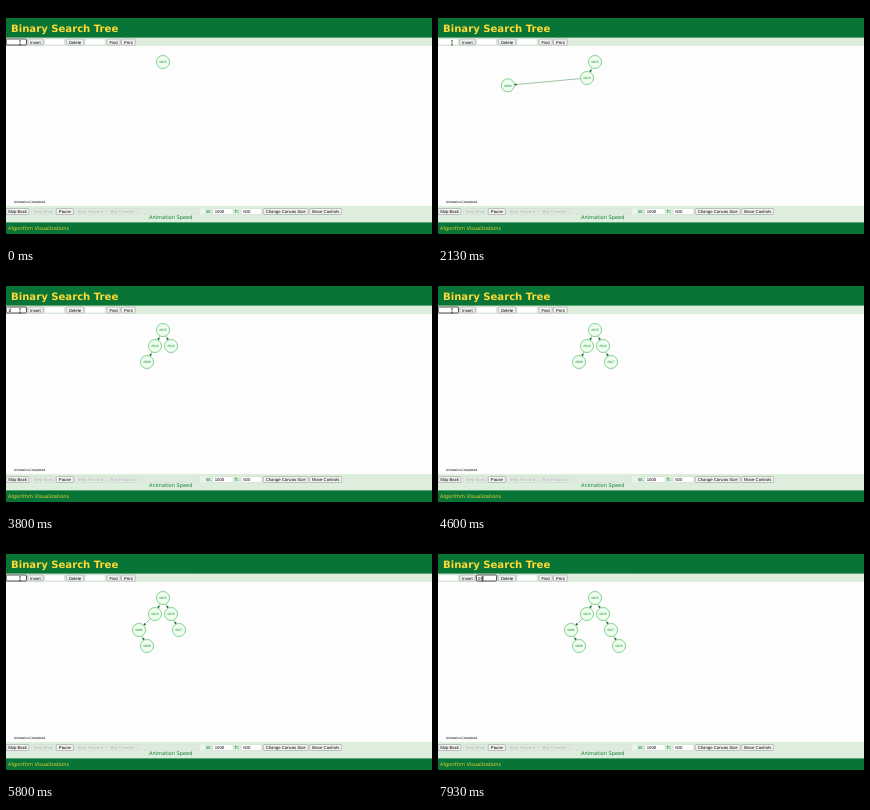
These frames come from a looping animation (426 px wide and 240 px high, 8000 ms). An HTML page:

```html
<!DOCTYPE html>
<html lang="en">
<head>
<meta charset="utf-8">
<title>Binary Search Tree</title>
<style>
  html, body { margin: 0; width: 100%; height: 100%; overflow: hidden; background: #000; }
  svg { display: block; width: 100%; height: 100%; }
  text {
    font-family: "Liberation Sans", Arial, sans-serif;
    font-size: 4.25px;
    text-rendering: geometricPrecision;
  }
  .page { font-family: "DejaVu Sans", Verdana, sans-serif; font-size: 5.08px; }
  .title { font-size: 10.1px; font-weight: bold; }
  .gold { fill: #ffd936; }
  .green { fill: #15813c; }
  .small { font-size: 3.25px; }
  .button { fill: #f1f2f1; stroke: #8a8f8a; stroke-width: .5; }
  .off .button { fill: #e3ece3; stroke: #cad5ca; }
  .off text { fill: #a9b5a9; }
  .field { fill: #fff; stroke: #bcc5bc; stroke-width: .4; }
  .field.focused { stroke: #222; stroke-width: .8; }
  .node circle { fill: #efffef; stroke: #58b865; stroke-width: .7; }
  .node text { fill: #16802b; font-size: 3.25px; text-anchor: middle; }
  .edge { stroke: #2a7a37; stroke-width: .45; fill: #0b4a18; }
</style>
</head>
<body>
<svg viewBox="0 0 426 240" preserveAspectRatio="none">
  <rect width="426" height="240"/>
  <rect y="12" width="426" height="216" fill="#ddeedd"/>
  <rect y="12" width="426" height="19.6" fill="#087536"/>
  <rect y="40" width="426" height="160" fill="#fdfdfd"/>
  <rect y="216.4" width="426" height="11.6" fill="#087536"/>
  <text class="page title gold" x="5" y="25.8">Binary Search Tree</text>
  <text class="page gold" x="2" y="224.4" fill-opacity=".88">Algorithm Visualizations</text>
  <text class="page green" x="143" y="213.3">Animation Speed</text>
  <text class="page green" x="200" y="207.2">w:</text>
  <text class="page green" x="228.6" y="207.2">h:</text>
  <rect x="132" y="202.5" width="62" height="6" fill="#dfeadf" stroke="#d3dfd3" stroke-width=".4"/>
  <rect x="194" y="202.5" width="5" height="6" fill="#ecf2ec"/>
  <text class="small" x="8" y="196.7">Animation Completed</text>
  <g id="controls"></g>
  <g id="edges"></g>
  <g id="nodes"></g>
  <path id="caret" stroke="#111" stroke-width=".5" d="M0 34.1V38"/>
  <path id="pointer" stroke="#222" stroke-width=".55" fill="none" d="M-1 34.7H1M0 34.7V39M-1 39H1"/>
</svg>
<script>
const LOOP = 8000;
const RADIUS = 6.5;
const byId = id => document.getElementById(id);

function add(parent, tag, attrs = {}, text = '') {
  const el = document.createElementNS('http://www.w3.org/2000/svg', tag);
  set(el, attrs);
  el.textContent = text;
  return parent.appendChild(el);
}

function set(el, attrs) {
  for (const name in attrs) el.setAttribute(name, attrs[name]);
}

function button(label, x, y, width, off = false) {
  const group = add(byId('controls'), 'g', off ? { class: 'off' } : {});
  add(group, 'rect', { class: 'button', x, y, width, height: 6, rx: .8 });
  add(group, 'text', { x: x + width / 2, y: y + 4.5, 'text-anchor': 'middle' }, label);
}

function field(x, y, value = '') {
  const box = add(byId('controls'), 'rect', { class: 'field', x, y, width: 20.2, height: 6, rx: .7 });
  const text = add(byId('controls'), 'text', { x: x + 1.7, y: y + 4.5 }, value);
  return { x, box, text };
}

const insertField = field(.2, 33);
button('Insert', 22, 33, 15);
const deleteField = field(38.4, 33);
button('Delete', 60.3, 33, 17.5);
field(79, 33);
button('Find', 101, 33, 13.2);
button('Print', 115.4, 33, 13.9);

button('Skip Back', .2, 202.5, 22.6);
button('Step Back', 25.5, 202.5, 23.5, true);
button('Pause', 50.3, 202.5, 17.2);
button('Step Forward', 69, 202.5, 30.5, true);
button('Skip Forward', 101, 202.5, 30, true);
field(207, 202.5, '1000');
field(235.5, 202.5, '500');
button('Change Canvas Size', 257.3, 202.5, 44.7);
button('Move Controls', 303.7, 202.5, 32);

// Each insertion: value, parent, place, then typing, enter, settled and refocus times.
const inserts = [
  [15, null, 157, 56],
  [10, 15, 149, 72, 350, 650, 1050, 1250],
  [8, 10, 141, 88, 1500, 1800, 2250, 2500],
  [16, 15, 165, 72, 2800, 3130, 3480, 3620],
  [17, 16, 173, 88, 3800, 4050, 4400, 4530],
  [9, 8, 141, 104, 4850, 5070, 5450, 5650],
  [20, 17, 181, 104, 5950, 6180, 6580, 8000]
];

const nodes = inserts.map(([value, parent, x, y, type, enter = -1, settled = 0, focus]) => {
  const group = add(byId('nodes'), 'g', { class: 'node' });
  add(group, 'circle', { r: RADIUS });
  add(group, 'text', { y: 1.2 }, String(value).padStart(4, '0'));
  const edge = parent && add(byId('edges'), 'path', { class: 'edge' });
  return { value, parent, x, y, type, enter, settled, focus, group, edge };
});
const find = value => nodes.find(node => node.value === value);

function ease(from, to, t) {
  const p = Math.min(1, Math.max(0, (t - from) / (to - from)));
  return p * p * (3 - 2 * p);
}

function place(node, t) {
  const { enter, settled } = node;
  const p = ease(enter + (settled - enter) * .5, settled, t);
  let x = 10 + (node.x - 10) * p;
  const y = 72 + (node.y - 72) * p;
  if (node.value === 8) x -= 8 * ease(5260, 5450, t);
  return { x, y };
}

function arrow(a, b) {
  const angle = Math.atan2(b.y - a.y, b.x - a.x);
  const along = (point, distance, turn = 0) =>
    [point.x + distance * Math.cos(angle + turn), point.y + distance * Math.sin(angle + turn)];
  const tip = along(b, -RADIUS);
  const wing = turn => along({ x: tip[0], y: tip[1] }, -2.3, turn);
  return `M${along(a, RADIUS)}L${tip}M${wing(.45)}L${tip}L${wing(-.45)}Z`;
}

function typed(value, start, t) {
  const text = String(value);
  return text.slice(0, Math.max(0, Math.floor((t - start) / 130) + 1));
}

function drawTree(t) {
  for (const node of nodes) {
    const { x, y } = place(node, t);
    const display = t >= node.enter ? 'inline' : 'none';
    set(node.group, { display, transform: `translate(${x} ${y})` });
    if (!node.edge) continue;
    const linked = t >= node.enter + (node.settled - node.enter) * .5;
    set(node.edge, {
      display: linked ? 'inline' : 'none',
      d: arrow(place(find(node.parent), t), { x, y })
    });
  }
}

function drawControls(t) {
  const current = nodes.find(node => t >= node.type && t < node.enter);
  const busy = nodes.some(node => t >= node.enter && t < node.focus);
  const deleting = t >= 7300;
  const insertText = current ? typed(current.value, current.type, t) : '';
  const deleteText = deleting ? typed('09', 7650, t) : '';

  insertField.text.textContent = insertText;
  deleteField.text.textContent = deleteText;
  insertField.box.classList.toggle('focused', !busy && !deleting);
  deleteField.box.classList.toggle('focused', deleting);

  const active = deleting ? deleteField : insertField;
  const text = deleting ? deleteText : insertText;
  const caretX = active.x + 2 + text.length * 2.363;
  set(byId('caret'), { display: text ? 'inline' : 'none', transform: `translate(${caretX} 0)` });
  set(byId('pointer'), { transform: `translate(${14 + 30.5 * ease(6950, 7250, t)} 0)` });
}

function frame() {
  const t = performance.now() % LOOP;
  drawTree(t);
  drawControls(t);
  requestAnimationFrame(frame);
}
frame();
</script>
</body>
</html>
```
